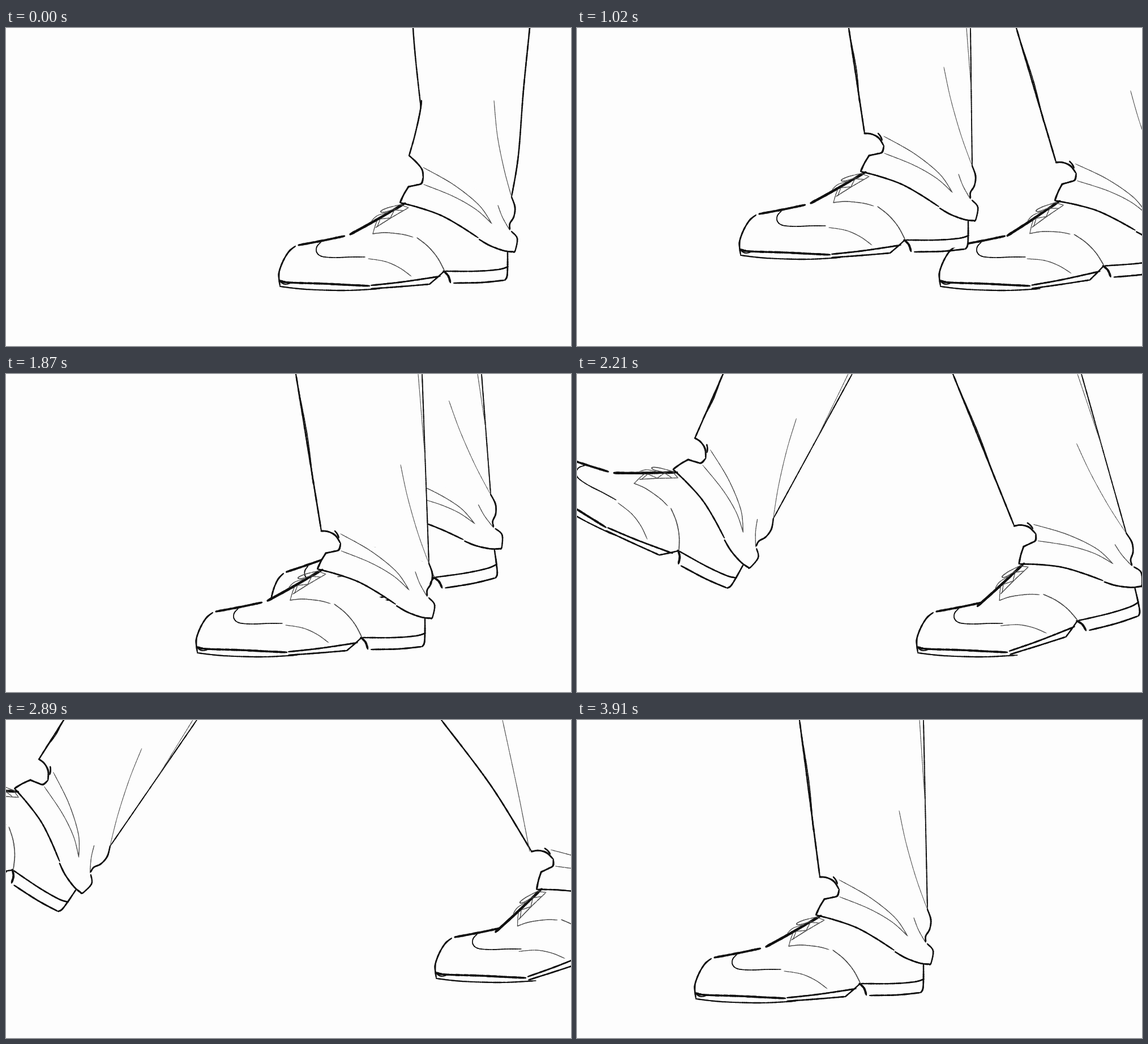
Recreate the animation shown at these times as an HTML page with a canvas. Size 998x561 px, loop 4.08 s.

```html
<!DOCTYPE html>
<html lang="en">
<head>
<meta charset="utf-8">
<title>Walking shoes</title>
<style>
  html, body { margin: 0; width: 100%; height: 100%; overflow: hidden; background: #fdfdfd; }
  canvas { display: block; width: 998px; height: 561px; }
</style>
</head>
<body>
<canvas id="stage" width="998" height="561"></canvas>
<script>
const ctx = document.getElementById('stage').getContext('2d');
const PAPER = '#fdfdfd';
const LOOP = 4080, FIRST_HOLD = 680, HOLD = 170;

// Shoe space: sole corner of the toe and the ball the shoe bends around.
const CORNER = [484, 455], BALL = [640, 450];

const stroke = (width, text) => ({ width, points: parse(text) });
function parse(text) {
  return text.split(' ').map(pair => pair.split(',').map(Number));
}

const toeLines = [
  stroke(2.8, '511,385 500,394 490,410 483,428 482,440 484,455'),
  stroke(3.8, '517,383 560,375 598,367'),
  stroke(1.8, '556,378 549,386 549,396 558,403 580,405 610,404 634,404'),
  stroke(3.6, '484,446 500,449 560,451 600,453 642,455'),
  stroke(2, '484,447 492,452 503,450'),
  stroke(2.2, '484,456 530,461 600,463 660,460')
];
const soleLines = [
  stroke(2.8, '645,454 700,448 767,438'),
  stroke(2.6, '645,460 700,456 748,452'),
  stroke(2.5, '748,452 762,440 774,429'),
  stroke(3.6, '773,429 781,437 785,449'),
  stroke(2.5, '775,429 830,429 870,426 887,421'),
  stroke(2.8, '791,450 840,449 880,445'),
  stroke(2.8, '886,396 886,420 885,438 881,445')
];
const upperLines = [
  stroke(4.4, '608,364 650,341 705,309'),
  stroke(1.4, '648,363 670,361 700,364 719,369'),
  stroke(1.6, '726,370 745,385 762,405 775,429'),
  stroke(1.3, '640,407 670,412 695,423 716,438')
];
const laceLines = [
  stroke(1.4, '700,311 675,317 662,323 668,325 690,318'),
  stroke(1.3, '646,340 656,331 675,325'),
  stroke(1.3, '648,363 652,349 656,339'),
  stroke(1.4, '653,352 680,335 711,317'),
  stroke(1.3, '656,350 661,337'),
  stroke(1.3, '661,337 679,335'),
  stroke(1.3, '679,335 686,321'),
  stroke(1.3, '686,321 701,322'),
  stroke(1.3, '697,312 711,317')
];
const cuffLines = [
  stroke(2.6, '696,308 730,317 767,330 800,348 834,370'),
  stroke(2.8, '836,373 855,384 880,393 898,395'),
  stroke(3, '711,280 703,293 696,308'),
  stroke(3, '711,280 725,277 734,274 737,263'),
  stroke(1.3, '737,246 790,276 835,312 858,345'),
  stroke(1.2, '738,276 790,297 830,320 858,345'),
  stroke(1.3, '869,313 877,334 890,357'),
  stroke(2.8, '893,298 899,316 897,333 890,345 890,355'),
  stroke(2.5, '893,359 903,371 900,391 897,396')
];
const roundFold = [
  stroke(3, '703,241 715,242 728,249 737,263'),
  stroke(2.8, '727,241 731,246 734,253')
];
const longCrease = stroke(1, '843,124 855,180 873,243 892,296');
const kneelessLeg = [
  stroke(2.4, '718,-40 719,0 724,60 733,142'),
  stroke(2.6, '734,128 731,150 722,190 712,225'),
  stroke(2.8, '712,225 725,237 735,250 737,264'),
  stroke(2.6, '928,-40 925,0 914,110 905,225 893,298'),
  stroke(1.1, '862,128 868,190 880,250 893,298')
];
const toeShape = parse('511,384 606,366 650,341 660,460 600,463 530,461 484,456 482,435 490,410');
const rearShape = parse('606,366 705,309 886,396 885,440 791,450 774,430 748,452 640,460');
const cuffShape = parse('703,241 737,263 711,280 696,308 767,330 836,371 898,395 903,371 890,350 899,316 893,298');
const uprightShape = parse('718,-40 733,140 712,225 893,298 905,225 928,-40');

function turnAround([cx, cy], degrees) {
  const c = Math.cos(degrees * Math.PI / 180), s = Math.sin(degrees * Math.PI / 180);
  return ([x, y]) => [cx + (x - cx) * c - (y - cy) * s, cy + (x - cx) * s + (y - cy) * c];
}

// Steady pseudo-random grain, so every redraw looks the same.
const grain = n => { const v = Math.sin(n * 12.9898) * 43758.5453; return v - Math.floor(v); };

function spline(points, t) {
  const last = points.length - 1;
  const i = Math.min(Math.floor(t * last), last - 1), u = t * last - i;
  const at = k => points[Math.max(0, Math.min(last, k))];
  const mix = axis => {
    const [a, b, c, d] = [at(i - 1)[axis], at(i)[axis], at(i + 1)[axis], at(i + 2)[axis]];
    return b + u / 2 * (c - a + u * (2 * a - 5 * b + 4 * c - d + u * (3 * (b - c) + d - a)));
  };
  return [mix(0), mix(1)];
}

// Pencil stroke: tapered ends and a slightly uneven edge.
function ink(width, points) {
  let length = 0;
  for (let i = 1; i < points.length; i++) {
    length += Math.hypot(points[i][0] - points[i - 1][0], points[i][1] - points[i - 1][1]);
  }
  const steps = Math.max(6, Math.round(length / 3));
  ctx.strokeStyle = width < 1.7 ? '#4a4a4a' : '#111';
  let from = points[0];
  for (let i = 1; i <= steps; i++) {
    const t = i / steps, to = spline(points, t);
    const taper = Math.min(1, 0.65 + 6 * Math.min(t, 1 - t));
    ctx.lineWidth = width * taper * (0.85 + 0.25 * grain(i + width * 7));
    ctx.beginPath();
    ctx.moveTo(...from);
    ctx.lineTo(...to);
    ctx.stroke();
    from = to;
  }
}

function mask(points) {
  ctx.beginPath();
  points.forEach(p => ctx.lineTo(...p));
  ctx.fillStyle = PAPER;
  ctx.fill();
}

const between = (p, q, t) => [p[0] + (q[0] - p[0]) * t, p[1] + (q[1] - p[1]) * t];

function drawTrouser(leg, rear) {
  const shin = rear([703, 241]), calf = rear([893, 298]);
  const front = [leg.front, 0], back = [leg.back, 0];
  const middle = between(front, shin, 0.5);
  middle[0] += leg.bow;
  ink(2.7, [front, middle, shin]);
  if (!leg.bow) ink(1.8, [between(front, shin, 0.08), between(front, shin, 0.4), between(front, shin, 0.7)]
    .map(([x, y], i) => [x + [0, 2.5, -1][i], y]));
  ink(2, [back, calf]);
  ink(1, [[leg.back - 7, 0], between(back, calf, 0.45)]);
  if (leg.seam) ink(1.1, leg.seam);
  else ink(longCrease.width, longCrease.points.map(rear));
}

function drawLeg(leg) {
  const spin = turnAround(CORNER, leg.turn), flex = turnAround(BALL, leg.bend);
  const toe = p => {
    const [x, y] = spin(p);
    return [x + leg.x - CORNER[0], y + leg.y - CORNER[1]];
  };
  const rear = p => toe(flex(p));
  const draw = (lines, place) => lines.forEach(l => ink(l.width, l.points.map(place)));

  mask(toeShape.map(toe));
  mask(rearShape.map(rear));
  if (leg.upright) mask(uprightShape.map(rear));
  else mask([[leg.front, 0], rear([703, 241]), rear([893, 298]), [leg.back, 0]]);
  mask((leg.upright ? cuffShape.slice(1) : cuffShape).map(rear));

  draw(toeLines, toe);
  [soleLines, upperLines, laceLines, cuffLines].forEach(lines => draw(lines, rear));
  if (leg.upright) draw(kneelessLeg, rear);
  else {
    draw(roundFold, rear);
    drawTrouser(leg, rear);
  }
}

// x, y: toe corner; turn, bend: degrees; front, back: trouser edges at the top.
const leg = (x, y, turn, bend, front, back, extra) =>
  ({ x, y, turn, bend, front, back, bow: 0, ...extra });
const FAR = 455, NEAR = 491;
const planted = (x, y, front, back) => leg(x, y, 0, 0, front, back);
const upright = (x, y) => leg(x, y, 0, 0, 0, 0, { upright: true });

const nearStance = [planted(210, NEAR, 393, 612)];
const longStride = [
  leg(760, FAR, 0, -13.5, 769, 1150, { bow: 8, seam: [[877, 0], [905, 130], [925, 232]] }),
  leg(-243, 124, 34, 0, 102, 337)
];

// Each pose lists the far leg before the near one.
const slowSteps = [
  [upright(484, FAR)],
  [planted(570, FAR, 759, 973)],
  [planted(602, FAR, 774, 1000), leg(553, 430, -8, 0, 690, 910)],
  [leg(642, FAR, 0, -4, 776, 1040), leg(289, 400, 0, 0, 480, 695)],
  [leg(682, FAR, 0, -10, 770, 1090), leg(73, 368, 14, 0, 350, 565)],
  [leg(718, FAR, 0, -16, 757, 1150, { bow: 8, seam: [[918, 0], [958, 40], [998, 78]] }),
   leg(68, 392, 5.9, 0, 300, 512)],
  [leg(810, 460, -10, -15, 790, 1200, { bow: 6 }), planted(155, NEAR, 372, 585)],
  [leg(900, 455, -20, -15, 850, 1250), planted(208, NEAR, 393, 612)],
  [leg(473, 425, -8, 0, 620, 840), planted(338, NEAR, 512, 735)],
  [leg(178, 370, 8, 0, 420, 630), upright(469, NEAR)]
];
const quickSteps = [
  [leg(-87, 194, 29, 0, 258, 486), leg(602, NEAR, 0, -13, 664, 891)],
  [planted(-17, FAR, 215, 425), leg(760, 478, -17, -14, 700, 1150)],
  [planted(243, FAR, 435, 650), leg(500, 430, -8, 0, 650, 870)],
  [upright(502, FAR), leg(153, 370, 14, 0, 430, 650)],
  longStride,
  nearStance,
  [upright(456, FAR)],
  [leg(836, 468, -15.5, -13.5, 769, 1200), leg(-215, 78, 32, 0, 91, 311)],
  [upright(470, FAR)],
  longStride,
  nearStance
];
const poses = slowSteps.concat(quickSteps);

ctx.lineCap = 'round';
let shown = -1;
function tick(now) {
  const time = now % LOOP;
  const index = time < FIRST_HOLD ? 0
    : Math.min(poses.length - 1, 1 + Math.floor((time - FIRST_HOLD) / HOLD));
  if (index !== shown) {
    shown = index;
    ctx.fillStyle = PAPER;
    ctx.fillRect(0, 0, 998, 561);
    poses[index].forEach(drawLeg);
  }
  requestAnimationFrame(tick);
}
tick(performance.now());
</script>
</body>
</html>
```
